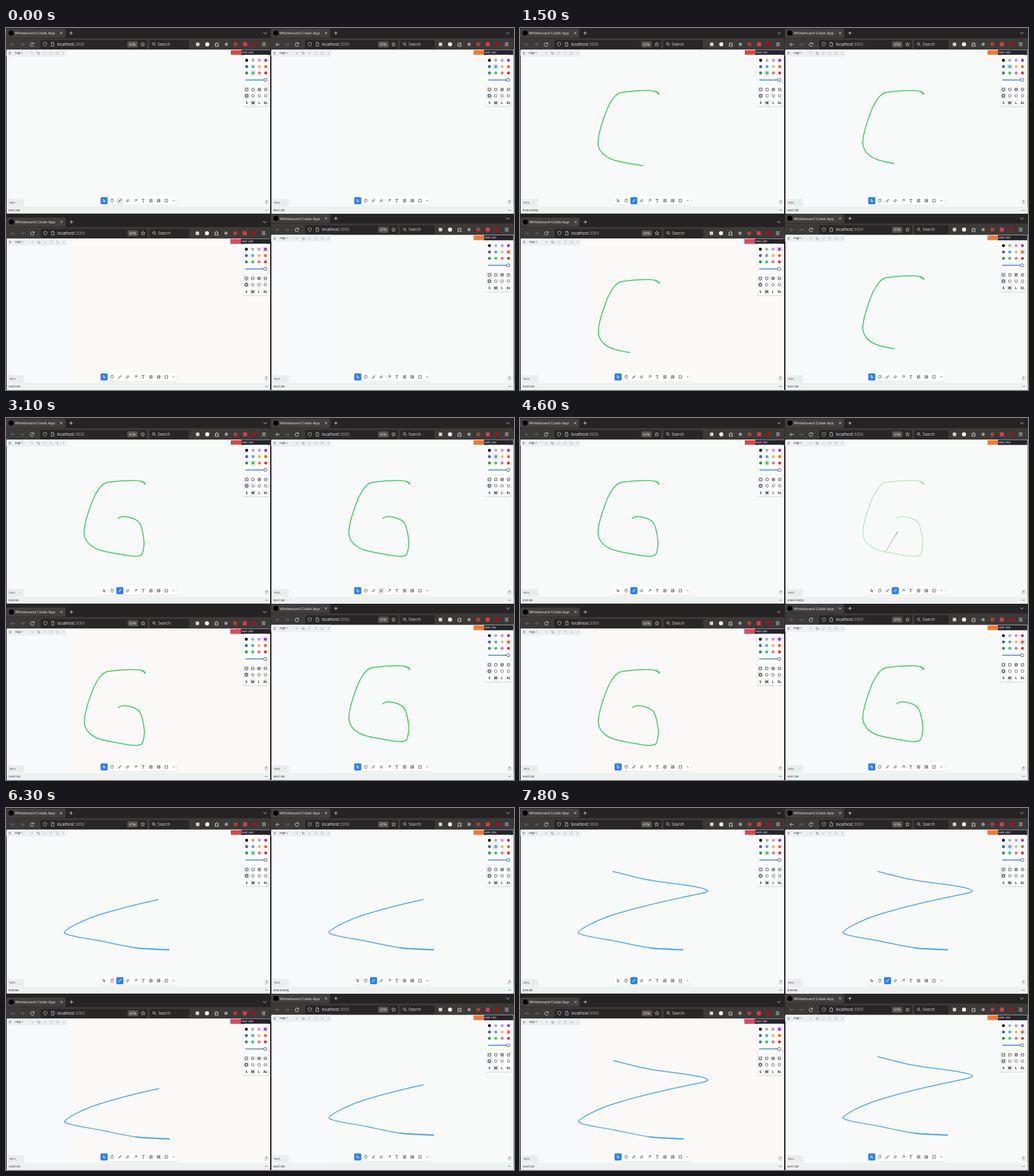
Recreate the animation shown at these times as an HTML page. Size 800 by 571 pixels, loop 8 s.

```html
<!DOCTYPE html>
<html lang="en">
<head>
<meta charset="utf-8">
<title>Shared whiteboard</title>
<style>
  html, body { margin: 0; width: 100%; height: 100%; overflow: hidden; background: #1f1c1e; }
  svg { display: block; width: 100vw; height: 100vh; }
  text { font-family: "Open Sans", "Noto Sans", sans-serif; }
  .ui { font-family: Inter, Roboto, sans-serif; }
</style>
</head>
<body>
<svg id="stage" viewBox="0 0 800 571" preserveAspectRatio="none"></svg>
<script>
const LOOP = 8000, STEP = 100;
const GREEN = '#3ccb5b', BLUE = '#4fa6ea', ACCENT = '#2f80ed';
const G_PATH = 'M219 105C218 101 212 98.5 200 98.5C185 98.5 170 100 160 101.5C150 103 143 116 138 126C130 146 122 168 123 183C124 195 134 204 148 208.5C160 212 180 215 195 217.5C203 218.5 211 219 214 215C217 208 218 198 217 192C216 182 213 168 209 164C204 159 196 157 191 156C185 155 179 156 176 159';
const Z_PATH = 'M257 223.5C240 223 220 222.5 207 221C185 218 165 213 150 210C130 206 96 202 91.5 197C92 191 125 175 150 167.5C200 152 260 140 280 136C288 134 295 133 295.5 131C295 128 285 126 277 124.5C255 120 225 118 200 113C180 109 165 104.5 146 100';
const SWATCHES = ['#111', '#aab1b8', '#df86f0', '#a92fc4', '#3f5fd8', '#55a6ec', '#f4b86a', '#e5691c', '#2f9a5c', '#45ca62', '#ee6f93', '#df3836'];
const TOOL_X = [154.5, 167, 179.3, 191.5, 204, 216, 228.3, 240.3, 252.5, 264];
const TOOL_ICONS = [
  'M-1.5-2.3L-1.3 1.6L-.3.8L.6 2.4L1.2 2L.5.5L1.8.3Z',
  'M-1.8 0V-1.4H-1V-2.2H0V-2.4H1V-1.8H1.8V1L1 2.3H-.8L-2 .4Z',
  'M-2 2.2L-1.6.9L1.4-2.3L2.1-1.6L-.9 1.7Z',
  'M-2.3.7L.5-2.2L2.3-.5L-.5 2.2H-1.1ZM-1-.8L.9 1',
  'M-1.8 1.8L1.8-1.8M-.8-1.8H1.8V.8',
  'M-1.9-1.4V-2.1H1.9V-1.4M0-2.1V2.2M-.8 2.2H.8',
  'M1-2.1H-2.1V2.1H2.1V0M-.8.8V-.3L1.8-2.4L2.3-1.8L.3.8Z',
  'M-2.1-2.1H2.1V2.1H-2.1ZM-2 1.4L-.6-.2L.6 1L1.2.3L2 1.2M.5-2V0H2',
  'M-2.1-2.1H2.1V2.1H-2.1Z',
  'M-1.5.7L0-.7L1.5.7'
];

// Piecewise-linear value through [time, value] pairs.
function track(keys, t) {
  if (t <= keys[0][0]) return keys[0][1];
  for (let i = 1; i < keys.length; i++) {
    const [t0, a] = keys[i - 1], [t1, b] = keys[i];
    if (t < t1) return a + (b - a) * (t - t0) / (t1 - t0);
  }
  return keys[keys.length - 1][1];
}
// Latest value whose start time has passed.
const hold = (keys, t) => keys.reduce((v, [at, next]) => t >= at ? next : v, keys[0][1]);

const rect = (x, y, w, h, fill, rx = 0, extra = '') =>
  `<rect x="${x}" y="${y}" width="${w}" height="${h}" rx="${rx}" fill="${fill}" ${extra}/>`;
const dot = (x, y, r, fill, extra = '') => `<circle cx="${x}" cy="${y}" r="${r}" fill="${fill}" ${extra}/>`;
const line = (x, y, d, color, w = .8, extra = '') =>
  `<path transform="translate(${x} ${y})" d="${d}" fill="none" stroke="${color}" stroke-width="${w}" stroke-linejoin="round" ${extra}/>`;
const label = (x, y, s, size, fill, extra = '') =>
  `<text x="${x}" y="${y}" font-size="${size}" fill="${fill}" ${extra}>${s}</text>`;
const at = (x, y, body) => `<g transform="translate(${x} ${y})">${body}</g>`;

function browserLeft(backColor) {
  const fg = '#e6e4e3', dim = '#777472';
  return rect(0, 1, 93.5, 14.5, '#413e3e', 2) +
    dot(8, 8, 4, '#000') +
    label(14, 10.3, 'Whiteboard Colab App', 6, '#f3f1f0') +
    line(87, 8, 'M-1.7-1.7L1.7 1.7M1.7-1.7L-1.7 1.7', fg, .7) +
    line(102.5, 8, 'M-2.7 0H2.7M0-2.7V2.7', fg, .8) +
    line(11, 26, 'M3 0H-3M-.4-2.6L-3 0L-.4 2.6', backColor) +
    line(25.5, 26, 'M-3 0H3M.4-2.6L3 0L.4 2.6', dim) +
    line(41, 26, 'M2.3-1.6A2.8 2.8 0 1 0 2.8.6M2.8-3V-1H.7', fg);
}

function addressBar(shift) {
  const fg = '#d5d2d0';
  return rect(54, 19, 168 + shift, 14, '#282626', 2) +
    line(61.5, 25.7, 'M0-3L2.6-2C2.6 .8 1.8 2.2 0 3.1C-1.8 2.2-2.6 .8-2.6-2Z', fg, .7) +
    line(73.3, 25.7, 'M-2-3H.7L2-1.6V3H-2ZM.6-3V-1.5H2', fg, .7) +
    label(80.5, 28, 'localhost<tspan fill="#a5a2a0">:3000</tspan>', 6.4, '#f5f3f2') +
    at(shift, 0,
      rect(191, 21, 16.5, 9.6, '#565352', 2) +
      label(199.2, 27.8, '67%', 5.2, '#f0eeec', 'text-anchor="middle"') +
      line(215.3, 25.7, 'M0-3.2L.9-1L3.2-.9L1.4.6L2 2.9L0 1.6L-2 2.9L-1.4.6L-3.2-.9L-.9-1Z', fg, .7) +
      rect(226, 19, shift ? 54 - 0 : 62, 14, '#282626', 2) +
      line(233, 25.5, 'M1 1L2.9 2.9M1.4-.5A1.9 1.9 0 1 1-2.4-.5A1.9 1.9 0 1 1 1.4-.5Z', fg, .8) +
      label(239, 28, 'Search', 6.2, '#dbd8d6'));
}

function browserRight() {
  return line(408, 8, 'M-2.6-1.2L0 1.3L2.6-1.2', '#e6e4e3') +
    rect(299.2, 23, 5.4, 5.4, '#d5d2d0', 1) +
    dot(317, 25.7, 3.2, '#f4f4f4') +
    line(332, 26, 'M-2.6-1.7H-.7V-2.8H.8V-1.7H2.5V.1H1.4V1.4H2.5V2.9H-2.6V1.3H-1.6V0H-2.6Z', '#dedbd9') +
    dot(347, 25.7, 2.6, '#98938f') +
    dot(361.5, 25.7, 3.2, '#a54132') +
    rect(373.3, 22.5, 6.4, 6.4, '#d93a43', 1) +
    dot(391, 25.7, 3.4, '#9d1418') +
    line(406.2, 25.7, 'M-2.8-2.2H2.8M-2.8 0H2.8M-2.8 2.2H2.8', '#e6e4e3');
}

function pageMenu() {
  const ink = '#4b4f54', dim = '#b6babd';
  return rect(.5, 34.5, 94.5, 10.5, '#eceff0', 1.5) +
    line(6, 39.7, 'M-1.6-1.3H1.6M-1.6 0H1.6M-1.6 1.3H1.6', ink, .5) +
    label(14, 41.1, 'Page 1', 3.9, '#333', 'class="ui"') +
    line(41, 39.7, 'M-1.4-.6L0 .7L1.4-.6', ink, .5) +
    line(51, 39.7, 'M-.6-1.8L-1.9-.6L-.6.6M-1.8-.6H.7A1.2 1.2 0 0 1 .7 1.8H-1', ink, .5) +
    line(61, 39.7, 'M.6-1.8L1.9-.6L.6.6M1.8-.6H-.7A1.2 1.2 0 0 0-.7 1.8H1', dim, .5) +
    line(71, 39.7, 'M-1.8-1.2H1.8M-1.3-1L-1 2H1L1.3-1M-.5-1.8H.5', dim, .5) +
    line(80.7, 39.7, 'M-1.8-1.8H.8V.8H-1.8ZM1.8-.8V1.8H-.8', dim, .5) +
    [-1.4, 0, 1.4].map(d => dot(90.5, 39.7 + d, .4, ink)).join('');
}

function userBar(color, dashed) {
  const edge = dashed ? 'stroke="#9b45b8" stroke-width=".7" stroke-dasharray="2 1.5"' : '';
  return rect(354, 35, 16.5, 7.3, color, 0, edge) +
    rect(370.5, 34.5, 46, 8, '#25232b') +
    label(371.5, 40, 'New User', 4, '#f2f2f2', 'class="ui"');
}

function palette(selected) {
  const col = i => 379 + i * 10, ink = '#35383c';
  let s = rect(373.8, 43, 40, 81.6, '#000', 2.5, 'opacity=".16"') + rect(374, 42.6, 39.5, 81, '#fff', 2.5);
  SWATCHES.forEach((c, i) => {
    const x = col(i % 4), y = 51 + 10 * Math.floor(i / 4);
    if (i === selected) s += rect(x - 4.6, y - 4.6, 9.2, 9.2, '#e5e8ea', 1.5);
    s += dot(x, y, 2.4, c);
  });
  s += line(377, 82, 'M0 0H33', '#4387e0', 1.4) + dot(408.7, 82, 2.5, '#fff', 'stroke="#222" stroke-width=".7"');
  s += line(374, 89.8, 'M0 0H39.5', '#e4e6e8', .6);
  s += [97, 107, 118].map((y, i) => rect(col(i === 2 ? 1 : 0) - 4.6, y - 4.6, 9.2, 9.2, '#e8eaec', 1.5)).join('');
  for (let i = 0; i < 4; i++) {
    s += rect(col(i) - 2, 95, 4, 4, i === 2 ? '#c9cccf' : 'none', .5, `stroke="${ink}" stroke-width=".8"`);
    if (i > 1) s += line(col(i), 97, 'M-1 1L1-1', ink, .6);
    s += dot(col(i), 107, 2.1, 'none', `stroke="${ink}" stroke-width="${i ? .7 : 1.1}"`);
    s += label(col(i), 119.8, ['S', 'M', 'L', 'XL'][i], 4.9, '#222', 'class="ui" font-weight="700" text-anchor="middle"');
  }
  return s;
}

function toolbar() {
  return rect(148.8, 266, 120, 14, '#000', 3, 'opacity=".13"') + rect(149, 265.7, 119.5, 13.6, '#fff', 3) +
    rect(0, 267, 11, 11, '#e6e9eb', 2, 'class="hover"') +
    rect(0, 266.8, 11.2, 11.2, ACCENT, 2, 'class="active"') +
    TOOL_ICONS.map((d, i) => line(TOOL_X[i], 272.3, d, '#333', .65, 'class="tool"')).join('');
}

const strokePaths = (name, d, color) =>
  `<path class="${name}" d="${d}" pathLength="1" fill="none" stroke="${color}" stroke-width="1.5" stroke-linejoin="round"/>` +
  `<path class="${name} tip" d="${d}" pathLength="1" fill="none" stroke="${color}" stroke-width="2"/>`;

// rx: shift of right-anchored parts, mid: shift of zoom badge and search, dy: shift of the top, low: shift of the bottom.
const PANES = [
  { x: 0, dy: 0, rx: 0, mid: 0, tools: 0, low: 0, top: 0, bottom: 292.5, selected: 9, user: '#d8484b', bg: '#f8faf9' },
  { x: 417, dy: 0, rx: 382.3, mid: -22, tools: 399.5, low: 0, top: 0, bottom: 293, selected: 5, user: '#f07a33', bg: '#f8faf9' },
  { x: .5, dy: 298, rx: -.5, mid: 0, tools: 0, low: 278, top: 293.5, bottom: 571, selected: 3, user: '#dc4a5e', bg: '#faf9f7' },
  { x: 417, dy: 292.3, rx: 382.3, mid: -22, tools: 399.5, low: 278, top: 293, bottom: 571, selected: 7, user: '#f07a33', bg: '#f8faf9' }
];

function paneMarkup(p, i) {
  const left = i % 2 ? 418 : 1, right = i % 2 ? 799.5 : 416, width = right - left;
  const content = p.dy + 34;
  return rect(left - 1, p.top, width + 1.5, content - p.top, '#252324') +
    rect(left - 1, p.dy + 16, width + 1.5, 18.3, '#3c3939') +
    rect(left, content, width, p.bottom - content, p.bg) +
    (i ? rect(left, content, i === 2 ? 106 : 94, p.bottom - content, '#f7f9fb') : '') +
    at(p.x, p.dy, browserLeft(i === 1 ? '#e6e4e3' : '#777472') + addressBar(p.mid)) +
    at(p.rx, p.dy, browserRight()) +
    at(p.x, p.dy + (i === 2 ? .3 : 0), strokePaths('g', G_PATH, GREEN) + strokePaths('z', Z_PATH, BLUE)) +
    at(p.x, p.dy, pageMenu()) +
    at(p.rx, p.dy, userBar(p.user, i === 2)) +
    `<g class="palette">${at(p.rx, p.dy, palette(p.selected))}</g>` +
    rect(left, 281.6 + p.low, width, p.bottom - 281.6 - p.low, '#edf1f0') +
    rect(left, 269.8 + p.low, 27.5, 11.4, '#e9edec', 1.5) +
    label(p.x + 5, 276.6 + p.low, '100%', 3.7, '#333', 'class="ui"') +
    line(p.x + 22, 275.3 + p.low, 'M-.8-.3L0 .4L.8-.3', '#a0a5a8', .4) +
    label(p.x + 4, 288.6 + p.low, '', 3.8, '#333', 'class="ui status"') +
    at(p.rx, p.low,
      dot(410.5, 275, 4.3, '#e6eae9') + label(410.5, 277, '?', 5.5, '#444', 'class="ui" text-anchor="middle"') +
      [-1.6, 0, 1.6].map(d => dot(410.5 + d, 287.3, .5, '#333')).join('')) +
    at(p.tools, p.low, toolbar());
}

const stage = document.getElementById('stage');
stage.innerHTML = rect(0, 0, 800, 571, '#1f1c1e') +
  PANES.map((p, i) => `<g>${paneMarkup(p, i)}</g>`).join('') +
  '<path id="scribble" fill="#c5cac9"/>';

const scribble = document.getElementById('scribble');
const views = [...stage.querySelectorAll(':scope > g')].map(g => {
  const all = s => [...g.querySelectorAll(s)], one = s => g.querySelector(s);
  return { g: all('.g'), z: all('.z'), tools: all('.tool'), hover: one('.hover'), active: one('.active'), palette: one('.palette'), status: one('.status') };
});

const G_KEYS = [[840, 0], [1500, .687], [1700, .82], [1900, .92], [2140, .92], [2300, .985], [2400, .985], [2440, 1]];
const Z_KEYS = [[5850, 0], [6500, .88], [6700, .955], [6900, 1]];
const IDLE = { status: [[0, 'select.idle']], tool: [[0, 0]], hover: [[0, -1]] };
const SCRIPT = [
  {
    status: [[0, 'select.idle'], [100, 'draw.idle'], [900, 'draw.drawing'], [2300, 'draw.idle']],
    tool: [[0, 0], [100, 2]],
    hover: [[0, 2], [100, -1]]
  },
  {
    status: [[0, 'select.idle'], [3800, 'eraser.idle'], [4300, 'eraser.erasing'], [4800, 'eraser.idle'], [5600, 'draw.idle'], [5900, 'draw.drawing'], [7200, 'draw.idle']],
    tool: [[0, 0], [3800, 3], [5600, 2]],
    hover: [[0, -1], [3000, 1], [3100, 3], [3800, -1], [5200, 2], [5600, -1]]
  },
  IDLE, IDLE
];

function reveal(paths, amount, tipLimit) {
  for (const path of paths) {
    const shown = path.classList.contains('tip') ? Math.min(amount, tipLimit) : amount;
    path.style.display = shown > 0 ? '' : 'none';
    path.setAttribute('stroke-dasharray', shown >= 1 ? 'none' : `${shown} 2`);
  }
}

function drawScribble(t) {
  const visible = t >= 4400 && t < 4800;
  scribble.style.display = visible ? '' : 'none';
  if (!visible) return;
  const point = k => [574.5 + 20 * k, 213 - 33.5 * k];
  const [tx, ty] = point(track([[4600, 0], [4800, 1]], t));
  const [hx, hy] = point(track([[4300, 0], [4600, 1]], t));
  scribble.setAttribute('d', `M${tx - .4} ${ty - .2}L${hx - 1} ${hy - .5}Q${hx + .7} ${hy - 1.6} ${hx + 1} ${hy + .6}L${tx + .4} ${ty + .2}Z`);
}

function render(time) {
  const t = Math.floor(time % LOOP / STEP) * STEP;
  views.forEach((v, i) => {
    const { status, tool, hover } = SCRIPT[i];
    const active = hold(tool, t), over = hold(hover, t);
    reveal(v.g, t < 4800 ? track(G_KEYS, i ? t - 60 : t) : 0, .025);
    reveal(v.z, track(Z_KEYS, t), .1);
    v.g.forEach(p => p.setAttribute('opacity', i === 1 && t >= 4400 ? .34 : 1));
    v.status.textContent = hold(status, t);
    v.palette.style.display = active === 3 ? 'none' : '';
    v.active.setAttribute('x', TOOL_X[active] - 5.6);
    v.hover.style.display = over < 0 ? 'none' : '';
    if (over >= 0) v.hover.setAttribute('x', TOOL_X[over] - 5.5);
    v.tools.forEach((icon, k) => icon.setAttribute('stroke', k === active ? '#fff' : '#333'));
  });
  drawScribble(t);
}

const start = performance.now();
function frame() {
  render(performance.now() - start);
  requestAnimationFrame(frame);
}
frame();
</script>
</body>
</html>
```
